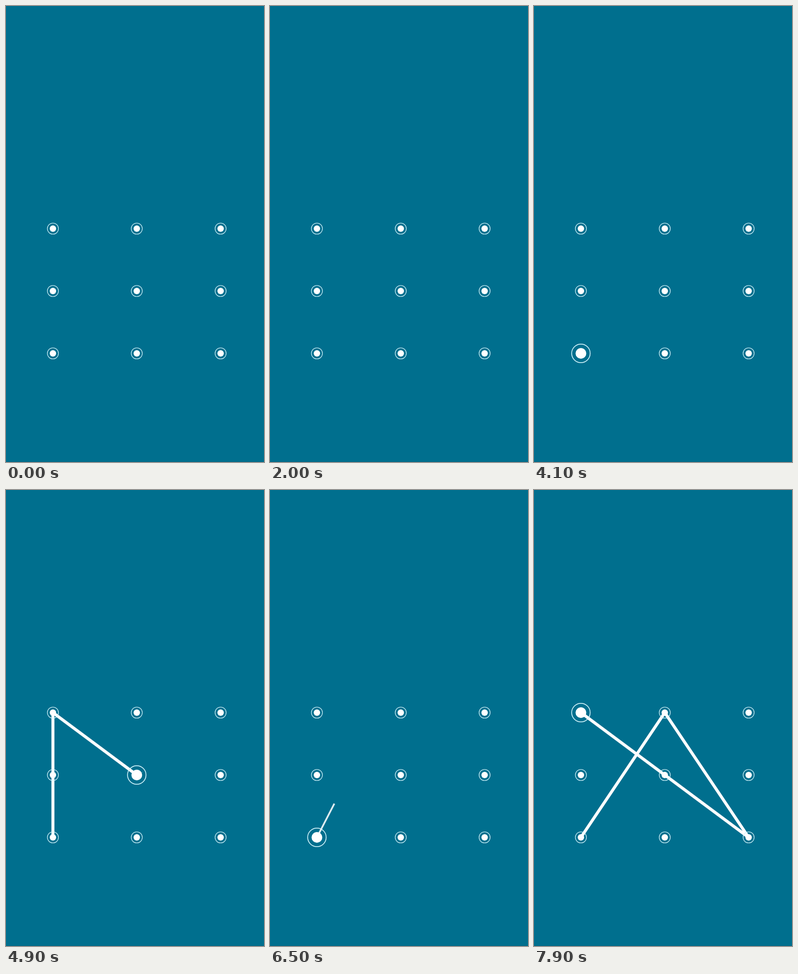
An HTML page with a canvas for the animation above (8 s loop, 480 px wide and 848 px high).

```html
<!DOCTYPE html>
<html lang="en">
<head>
<meta charset="utf-8">
<title>Pattern lock</title>
<style>
  html, body { margin: 0; width: 100%; height: 100%; overflow: hidden; background: #006f8e; }
  canvas { display: block; width: 480px; height: 848px; }
</style>
</head>
<body>
<canvas id="stage" width="480" height="848"></canvas>
<script>
const LOOP = 8000, STEP = 100, PULSE = 230, LINE = 5.6;
const ctx = document.getElementById('stage').getContext('2d');

// Dots are numbered 1 to 9 by row.
const dotAt = n => ({ x: 87.3 + (n - 1) % 3 * 156, y: 414 + Math.floor((n - 1) / 3) * 116 });

// ease above 1 slows the finger towards the end, below 1 speeds it up;
// sway bows its way to the right of each straight line.
const strokes = [
  { order: '741236987', start: 200, span: 1500, clear: 1800, ease: 1.48, sway: 25 },
  { order: '1235789', start: 2300, span: 1050, clear: 3500, ease: 1, sway: 12 },
  { order: '7415369', start: 4100, span: 1450, clear: 5600, ease: 0.9, sway: 12 },
  { order: '72951', start: 6400, span: 1350, clear: LOOP, ease: 1, sway: -11.5 }
];

// Each dot is reached when the eased distance along the path gets to it.
for (const s of strokes) {
  let length = 0;
  s.stops = [...s.order].map((n, i, all) => {
    const p = dotAt(+n), prev = dotAt(+all[Math.max(0, i - 1)]);
    length += Math.hypot(p.x - prev.x, p.y - prev.y);
    return { ...p, n: +n, dist: length, fresh: all.indexOf(n) === i };
  });
  s.length = length;
  for (const p of s.stops) {
    p.time = s.start + s.span * (1 - (1 - p.dist / length) ** (1 / s.ease));
  }
}

function fingerAt(s, t) {
  const u = Math.min(1, (t - s.start) / s.span);
  const dist = s.length * (1 - (1 - u) ** s.ease);
  const i = s.stops.findIndex(p => p.dist > dist);
  if (i < 0) return s.stops[s.stops.length - 1];
  const a = s.stops[i - 1], b = s.stops[i];
  const gap = b.dist - a.dist, k = (dist - a.dist) / gap;
  const bow = s.sway * Math.sin(Math.PI * k) / gap;
  const dx = b.x - a.x, dy = b.y - a.y;
  return { x: a.x + dx * k - dy * bow, y: a.y + dy * k + dx * bow };
}

function drawLine(points, width, alpha = 1) {
  ctx.globalAlpha = alpha;
  ctx.lineWidth = width;
  ctx.strokeStyle = '#fff';
  ctx.beginPath();
  points.forEach(p => ctx.lineTo(p.x, p.y));
  ctx.stroke();
  ctx.globalAlpha = 1;
}

function drawStroke(s, t) {
  const path = s.stops.filter(p => p.fresh && p.time <= t);
  drawLine(path, LINE);
  const last = path[path.length - 1], tip = fingerAt(s, t);
  const reach = Math.hypot(tip.x - last.x, tip.y - last.y);
  // The loose end grows thicker and more solid with its length.
  if (reach > 1) drawLine([last, tip], Math.min(LINE, reach * 0.045), Math.min(1, 0.5 + reach / 190));
}

function drawDot({ x, y }, big) {
  ctx.beginPath();
  ctx.arc(x, y, big ? 17.2 : 10.3, 0, 2 * Math.PI);
  ctx.lineWidth = big ? 1.5 : 1.1;
  ctx.strokeStyle = '#d4f4fb';
  ctx.stroke();
  ctx.beginPath();
  ctx.arc(x, y, big ? 10 : 6, 0, 2 * Math.PI);
  ctx.fillStyle = '#fff';
  ctx.fill();
}

function draw(t) {
  ctx.fillStyle = '#006f8e';
  ctx.fillRect(0, 0, 480, 848);
  ctx.fillStyle = '#056583';
  ctx.fillRect(0, 847, 480, 1);
  ctx.lineJoin = 'round';

  const big = new Set();
  for (const s of strokes) {
    if (t >= s.start && t < s.clear) drawStroke(s, t);
    for (const p of s.stops) {
      if (p.fresh && t >= p.time && t < p.time + PULSE) big.add(p.n);
    }
  }
  for (let n = 1; n <= 9; n++) drawDot(dotAt(n), big.has(n));
}

const begin = performance.now();
function tick() {
  const t = (performance.now() - begin) % LOOP;
  draw(Math.floor(t / STEP) * STEP);
  requestAnimationFrame(tick);
}
tick();
</script>
</body>
</html>
```
